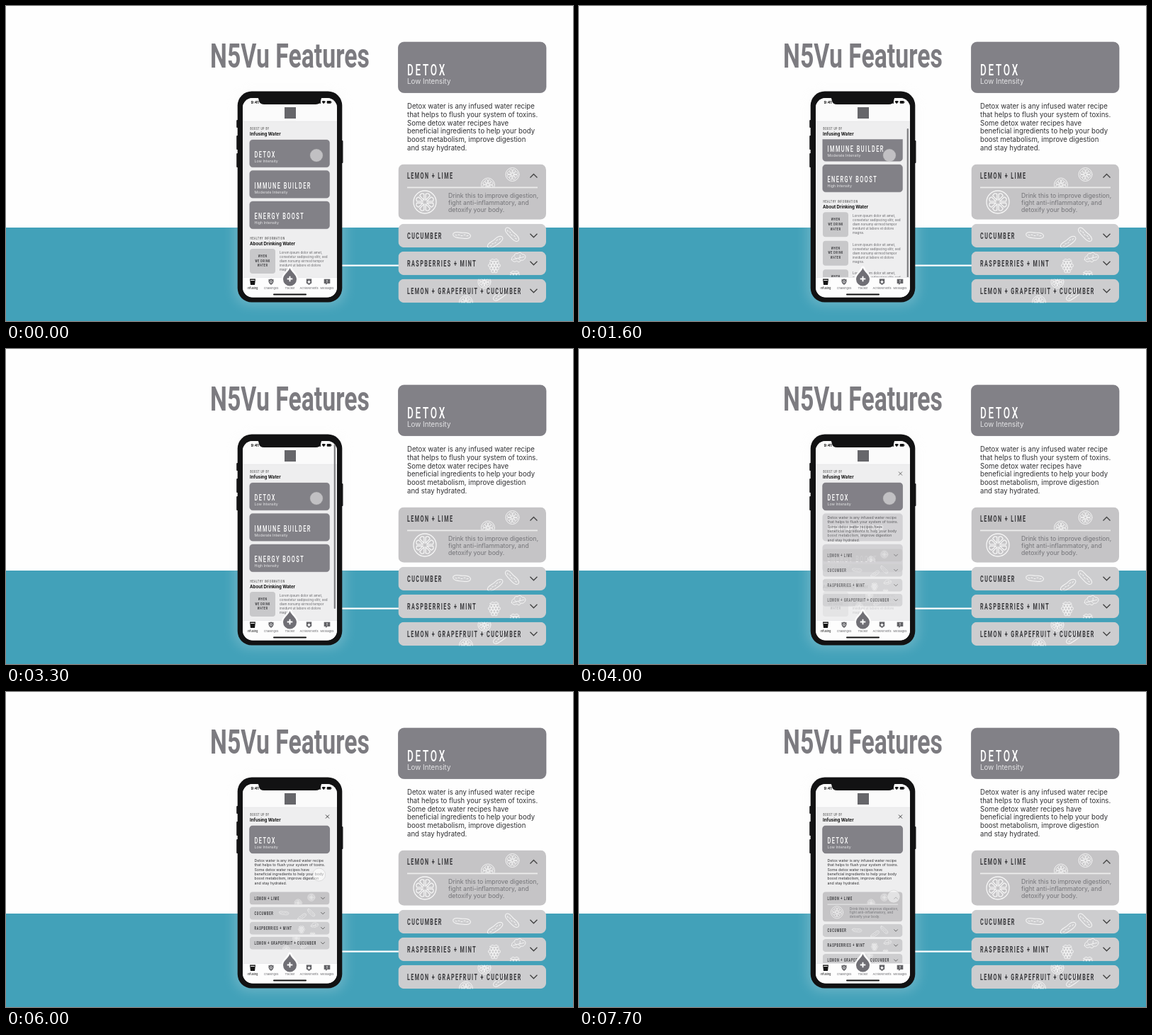
Animation, 800 px wide and 445 px high, one loop 8 s. Source, as an HTML page:

```html
<!DOCTYPE html>
<html lang="en">
<head>
<meta charset="utf-8">
<title>App features</title>
<style>
  html, body { margin: 0; width: 100%; height: 100%; overflow: hidden; background: #fff; }
  svg { font-family: Inter, "Open Sans", sans-serif; }
  #stage { display: block; width: 100vw; height: 100vh; }
  .cond { font-family: Roboto, "Liberation Sans", sans-serif; letter-spacing: .2em; }
  .title { letter-spacing: 0; }
  .ink { fill: none; stroke: #f6f6f6; stroke-linecap: round; stroke-linejoin: round; }
</style>
</head>
<body>
<svg id="stage" viewBox="0 0 800 445" preserveAspectRatio="none"></svg>
<script>
const LOOP = 8000;
const GREY = '#828187', PALE = '#cdcdcf', DARK = '#39393c';
const stage = document.getElementById('stage');

const rect = (x, y, w, h, r, fill, extra = '') =>
  `<rect x="${x}" y="${y}" width="${w}" height="${h}" rx="${r}" fill="${fill}" ${extra}/>`;
const text = (x, y, size, fill, str, extra = '') =>
  `<text x="${x}" y="${y}" font-size="${size}" fill="${fill}" ${extra}>${str}</text>`;
const lines = (x, y, size, pitch, fill, rows) =>
  rows.map((row, i) => text(x, y + i * pitch, size, fill, row)).join('');
const cond = (x, y, size, fill, str, weight = 500, extra = '') =>
  `<text class="cond" transform="translate(${x} ${y}) scale(.6 1)" font-size="${size}" fill="${fill}" font-weight="${weight}" ${extra}>${str}</text>`;
const at = (x, y, body, more = '') => `<g transform="translate(${x} ${y}) ${more}">${body}</g>`;
const ink = (d, w = .9) => `<path class="ink" stroke-width="${w}" d="${d}"/>`;

// White line drawings of the ingredients
function slice(x, y, r) {
  let d = `M${r} 0A${r} ${r} 0 1 1 ${-r} 0A${r} ${r} 0 1 1 ${r} 0`;
  for (let i = 0; i < 8; i++) {
    const p = (rad, da) => {
      const a = (i + da) * Math.PI / 4;
      return `${(rad * r * Math.cos(a)).toFixed(2)} ${(rad * r * Math.sin(a)).toFixed(2)}`;
    };
    d += `M${p(.18, .5)}L${p(.72, .14)}Q${p(.92, .5)} ${p(.72, .86)}Z`;
  }
  return at(x, y, ink(d, r > 12 ? 1.3 : .95));
}
const cucumber = (x, y, angle) => at(x, y,
  ink('M-12-2C-9-6-4-3 1-3.5S11-4 12.5 0C13 4 8 5 2 4.5S-14 4-12-2ZM-9 0l2 .6M-5-.5l2 .4M-1 .8l2 0M3-.6l2 0M7 .8l2-.3', 1),
  `rotate(${angle})`);
function raspberry(x, y) {
  let d = 'M-6-6Q-3-10 0-7Q3-10 6-6Q2-4 0-5Q-2-4-6-6Z';
  [[-3, 3], [1, 4], [5, 3], [9, 2]].forEach(([cy, n]) => {
    for (let i = 0; i < n; i++) {
      const cx = (i - (n - 1) / 2) * 4.2;
      d += `M${cx - 2.2} ${cy}a2.2 2.2 0 1 0 4.4 0a2.2 2.2 0 1 0-4.4 0`;
    }
  });
  return at(x, y, ink(d));
}
const leaf = (x, y, angle) => at(x, y,
  ink('M-10 1Q-9-4-5-4Q-4-8 0-6Q4-9 6-4Q11-3 10 1Q7 6 3 4Q0 8-3 4Q-8 6-10 1ZM-8 1L8 0M-3 1l-2-3M2 .5l1-4M0 1l2 3'),
  `rotate(${angle})`);

const card = (title, sub) =>
  rect(553.5, 51, 208.5, 71.5, 8, GREY, 'stroke="#76757b" stroke-width=".7"') +
  cond(566, 97.7, 22.6, '#fff', title) +
  text(566, 110.3, 9.8, '#e4e4e6', sub);

const row = (name, y, title, art, fill = PALE) =>
  `<svg class="${name}" x="553.5" y="${y}" width="208.5" height="33.5">` +
  rect(0, 0, 208.5, 33.5, 8, fill) + art +
  cond(12.5, 20.8, 12, DARK, title, 600) +
  `<path class="chev" d="M186 14l5 5 5-5" fill="none" stroke="#444" stroke-width="1.4"/></svg>`;

// Recipe panel, used large at the right and small on the phone
const panel = id => `<g id="${id}">` + card('DETOX', 'Low Intensity') +
  lines(566, 145, 9.65, 11.75, '#303033', [
    'Detox water is any infused water recipe', 'that helps to flush your system of toxins.',
    'Some detox water recipes have', 'beneficial ingredients to help your body',
    'boost metabolism, improve digestion', 'and stay hydrated.']) +
  row('lemon', 223.5, 'LEMON + LIME',
    `<svg width="208" height="32.5">${slice(126.5, 29, 9.5)}${slice(161, 14.5, 9.5)}</svg>` +
    '<g class="more">' + rect(12.5, 32, 184, 1.8, 0, '#ececec') + slice(37.5, 53.5, 16) +
    lines(70.5, 47, 8.7, 10.2, '#737377',
      ['Drink this to improve digestion,', 'fight anti-inflammatory, and', 'detoxify your body.']) + '</g>', '#c5c4c6') +
  row('cuc', 307.7, 'CUCUMBER', cucumber(89.5, 16, 2) + cucumber(136.5, 26, -38) + cucumber(160.5, 15, 42)) +
  row('rasp', 346.7, 'RASPBERRIES + MINT', raspberry(135.5, 19) + leaf(169.5, 9, -10) + raspberry(164.5, 36)) +
  row('mix', 385.7, 'LEMON + GRAPEFRUIT + CUCUMBER', slice(95.5, 33, 9.5) + slice(121.5, 4, 9) + cucumber(144.5, 22, -40)) +
  '</g>';

const K = .541;
const small = (body, dy = 0) => at(44.3, 161.4 + dy, body, `scale(${K})`);

const info = y => at(0, y,
  rect(344, 343, 36, 35, 4, '#c8c8ca') +
  ['WHEN', 'WE DRINK', 'WATER'].map((s, i) =>
    cond(362.2, 355.2 + i * 6.6, 5.8, DARK, s, 700, 'text-anchor="middle"')).join('') +
  lines(386, 350.2, 4.6, 6, '#66666a', ['Lorem ipsum dolor sit amet,', 'consetetur sadipscing elitr, sed',
    'diam nonumy eirmod tempor', 'invidunt ut labore et dolore', 'magna.']));

const list = '<g id="list">' + small(card('DETOX', 'Low Intensity')) + '<g id="rest">' +
  small(card('IMMUNE BUILDER', 'Moderate Intensity'), 43.5) +
  small(card('ENERGY BOOST', 'High Intensity'), 87) +
  cond(344.5, 330, 5.5, '#555', 'HEALTHY INFORMATION') +
  text(344, 338, 6.1, '#111', 'About Drinking Water', 'font-weight="700"') +
  info(0) + info(40.5) + info(81) + '</g></g>';

const tab = (x, label, fill, icon) =>
  at(x, 389.5, icon) + text(x, 399.7, 3.9, fill, label, 'text-anchor="middle"');
const shield = 'M-3.5-3.5Q0-3 0-4.5Q0-3 3.5-3.5V0Q3 3 0 4.5Q-3 3-3.5 0Z';
const tabs = rect(334, 383, 133, 30, 0, '#fdfdfd') + rect(334, 383, 133, .5, 0, '#d5d5d8') +
  tab(348, 'Infusing', '#111', '<path d="M-4-4H4L3 4.5H-3Z" fill="#151515"/><path d="M-2.8-2H2.8" stroke="#fff" stroke-width="1"/>') +
  tab(374, 'Challenges', '#66666a', `<path d="${shield}" fill="#626266"/><circle r="1.5" fill="none" stroke="#fff" stroke-width=".8"/>`) +
  '<path d="M400.500 370C402.500 376 410 379.500 410 386A9.500 9.500 0 0 1 391 386C391 379.500 398.500 376 400.500 370Z" fill="#706f75" stroke="#fdfdfd" stroke-width="5" stroke-linejoin="round" paint-order="stroke"/>' +
  '<path d="M396.700 385.500H404.300M400.500 381.700V389.300" stroke="#fff" stroke-width="1.8"/>' +
  tab(400.5, 'Tracker', '#66666a', '') +
  tab(427.5, 'Achievements', '#66666a', '<path d="M-3.7-4H3.7V2L0 4.5L-3.7 2Z" fill="#626266"/><path d="M0-2.5L.8-.7L2.5-.5L1.2.7L1.5 2.4L0 1.5L-1.5 2.4L-1.2.7L-2.5-.5L-.8-.7Z" fill="#fff"/>') +
  tab(453, 'Messages', '#66666a', '<path d="M-4.3-3.7H4.3V2.5H.5L-2 4.5V2.5H-4.3Z" fill="#626266"/><path d="M0-2.6V.1M0 .8V1.7" stroke="#fff" stroke-width=".9"/>') +
  rect(377, 406.6, 47, 1.9, 1, '#111');

const status = '<path d="M354 128H447Q444.500 130 444.500 132Q444 139 437 139H364Q357 139 356.500 132Q356.500 130 354 128Z" fill="#121213"/>' +
  text(345.5, 138.2, 5.4, '#111', '9:41', 'font-weight="700"') +
  [0, 1, 2, 3].map(i => rect(438 + i * 1.6, 136.8 - i * .8, 1.1, 1.2 + i * .8, .3, '#111')).join('') +
  '<path d="M445.500 135Q448.200 132.800 451 135L448.200 138.200Z" fill="#111"/>' +
  rect(452.7, 134, 6, 3.7, 1, '#111') + rect(459.1, 135.1, .6, 1.5, .3, '#111');

stage.innerHTML = `<defs>
  <clipPath id="screen">${rect(334, 130, 133, 281.5, 14, '#000')}</clipPath>
  <clipPath id="view">${rect(334, 188.3, 133, 195, 0, '#000')}</clipPath>
  <filter id="soft" x="-30%" y="-20%" width="160%" height="140%"><feGaussianBlur stdDeviation="8"/></filter>
</defs>` +
  rect(0, 0, 800, 445, 0, '#fefefe') + rect(0, 313, 800, 132, 0, '#42a1b9') +
  '<text class="cond title" transform="translate(288 87.3) scale(.69 1)" font-size="49" font-weight="600" fill="#7c7b80">N5Vu Features</text>' +
  rect(470, 365.5, 90, 2.2, 0, '#fff') + panel('big') +
  rect(322, 117, 157, 306, 22, '#f4f4f4', 'opacity=".22" filter="url(#soft)"') +
  rect(325.2, 161, 4, 11, 1, '#1b1b1c') + rect(325.2, 183, 4, 20, 1, '#1b1b1c') +
  rect(325.2, 208, 4, 20, 1, '#1b1b1c') + rect(471.5, 190, 4, 32, 1, '#1b1b1c') +
  rect(326.7, 120.6, 147.6, 298, 20, '#121213') +
  '<g clip-path="url(#screen)">' + rect(334, 128, 133, 284, 0, '#eeeeef') +
  rect(334, 128, 133, 35, 0, '#fbfbfb') + rect(334, 162.8, 133, .5, 0, '#dcdcde') +
  rect(393, 143, 16, 16, 0, '#66666a') +
  cond(344.5, 175, 5.4, '#555', 'BOOST UP BY') +
  text(344, 183, 6.1, '#111', 'Infusing Water', 'font-weight="700"') +
  `<g clip-path="url(#view)">${list}<g id="detail">${small(panel('mini'))}</g></g>` +
  '<path id="close" d="M451 173.500l5 5m0-5l-5 5" stroke="#333" stroke-width=".9"/>' +
  rect(462.7, 134, 2.2, 233, 1.1, '#7d7d80', 'id="bar"') + tabs + '</g>' + status +
  '<circle id="touch" r="9" fill="#fff" fill-opacity=".5" stroke="#aaa" stroke-opacity=".45" stroke-width=".7"/>';

const el = id => document.getElementById(id);
const set = (node, attrs) => { for (const k in attrs) node.setAttribute(k, attrs[k]); };
const ease = (t, a, b) => {
  const p = Math.min(1, Math.max(0, (t - a) / (b - a)));
  return p * p * (3 - 2 * p);
};

// p = 0: lemon row folded, p = 1: unfolded
function unfold(id, p) {
  const part = q => el(id).querySelector(q);
  const h = 33.5 + 44.7 * p, bend = 2.5 - 5 * p;
  set(part('.lemon'), { height: h });
  set(part('.lemon > rect'), { height: h });
  set(part('.more'), { opacity: p });
  set(part('.lemon .chev'), { d: `M186 ${16.5 - bend}L191 ${16.5 + bend}L196 ${16.5 - bend}` });
  ['cuc', 'rasp', 'mix'].forEach((name, i) => set(part('.' + name), { y: 262.7 + 39 * i + 45 * p }));
}

function draw(t) {
  const scroll = 52.6 * (ease(t, 450, 1450) - ease(t, 1500, 2950));
  const page = ease(t, 3600, 4200);
  const move = ease(t, 5500, 6380);
  set(el('list'), { transform: `translate(0 ${-scroll})` });
  set(el('rest'), { opacity: 1 - page });
  set(el('detail'), { opacity: page });
  set(el('close'), { opacity: page });
  set(el('bar'), {
    transform: `translate(0 ${scroll * .75})`,
    opacity: ease(t, 400, 600) - ease(t, 3300, 3700)
  });
  set(el('touch'), { cx: 438 + 6 * move, cy: 211 + 78 * move });
  unfold('mini', ease(t, 6850, 7600));
}

unfold('big', 1);
const start = performance.now();
function tick() {
  draw((performance.now() - start) % LOOP);
  requestAnimationFrame(tick);
}
tick();
</script>
</body>
</html>
```
